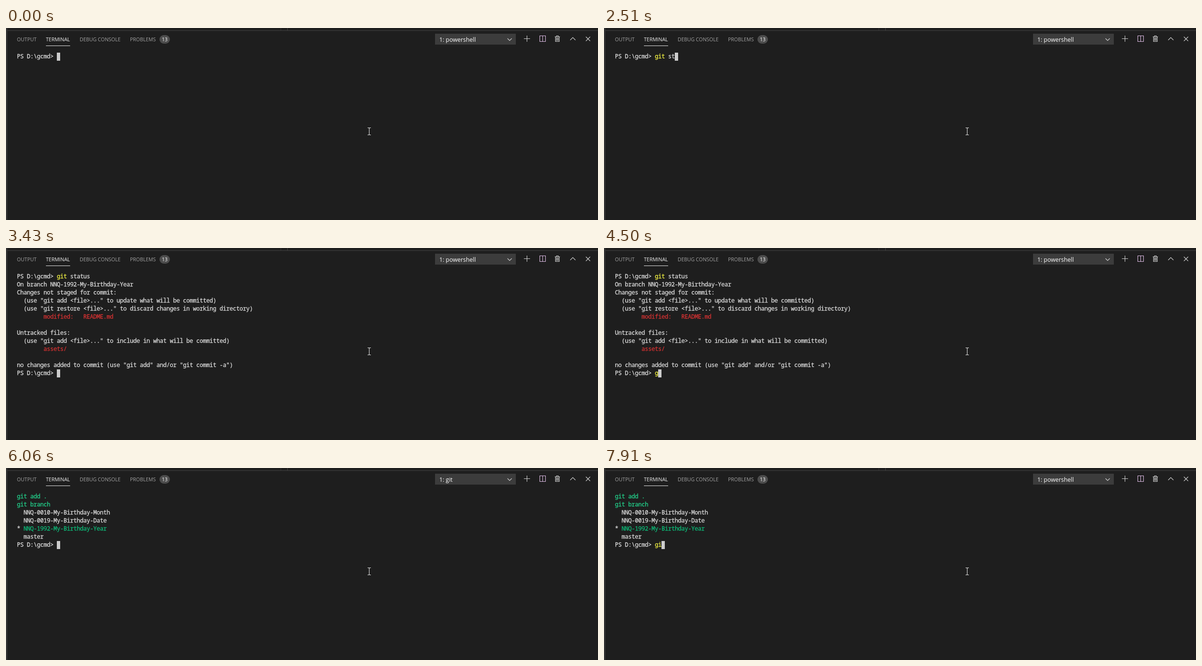
Recreate the animation shown at these times as an HTML page. Size 1246 by 405 pixels, loop 8 s.

```html
<!DOCTYPE html>
<html lang="en">
<head>
<meta charset="utf-8">
<title>Terminal</title>
<style>
html, body { margin: 0; width: 100%; height: 100%; overflow: hidden; background: #1e1e1e; }
svg { display: block; }
text { white-space: pre; }
.ui { font-family: "Open Sans", sans-serif; font-size: 10.5px; fill: #a2a2a2; }
.ui .on { fill: #f0f0f0; }
#title { font-size: 12.4px; fill: #fff; }
#term { font: 12.2px "Noto Sans Mono", monospace; letter-spacing: -.32px; }
#term text { fill: #dcdcdc; stroke: #dcdcdc; stroke-width: .3; }
#term .y { fill: #f5f543; stroke: #f5f543; }
#term .r { fill: #d63232; stroke: #d63232; }
#term .g { fill: #23d18b; stroke: #23d18b; }
#term .b { fill: #0dbc79; stroke: #0dbc79; }
.icons { fill: none; stroke: #d0d0d0; stroke-width: 1.1; }
</style>
</head>
<body>
<svg width="1246" height="405" viewBox="0 0 1246 405">
  <rect width="1246" height="405" fill="#1e1e1e"/>
  <path d="M0 0h3v405h-3z" fill="#333"/>
  <path d="M3 5.5H1246M592.5 0v5" stroke="#424242"/>
  <path d="M578.5 0v5" stroke="#333"/>
  <g class="ui">
    <text x="23" y="28">OUTPUT</text>
    <text x="84" y="28" class="on">TERMINAL</text>
    <text x="155" y="28">DEBUG CONSOLE</text>
    <text x="261" y="28">PROBLEMS</text>
    <path d="M84 37.5h51" stroke="#e7e7e7"/>
    <rect x="323" y="15" width="22" height="18" rx="9" fill="#4d4d4d"/>
    <text x="334" y="28" text-anchor="middle" style="fill:#fff">13</text>
    <rect x="903" y="12" width="170" height="23" fill="#3c3c3c"/>
    <text id="title" x="912" y="29"></text>
  </g>
  <g class="icons">
    <path d="M1055.5 22l4.5 4.5 4.5-4.5"/>
    <path d="M1090 22.5h13M1096.5 16v13"/>
    <path d="M1123.5 16.5h12v12h-12zM1129.5 16.5v12" stroke="#dfbde6"/>
    <path d="M1155 18.5h11M1158.5 18v-1.5h4v1.5M1156.5 19v9.5h8V19M1158.5 20v7M1160.5 20v7M1162.5 20v7"/>
    <path d="M1187.5 25.5l5.5-5.5 5.5 5.5M1220.5 18.5l9 9M1229.5 18.5l-9 9"/>
    <path d="M761 210.5h2.5l1 1 1-1h2.5M764.5 211v14M761 225.5h2.5l1-1 1 1h2.5" stroke="#e0e0e0"/>
  </g>
  <g id="term"></g>
</svg>
<script>
const LOOP = 8000, LEFT = 23, TOP = 52, CELL = 7, ROW = 17;
const PROMPT = 'PS D:\\gcmd> ';
const term = document.getElementById('term');
const title = document.getElementById('title');

// A run of text is a plain string or a [class, text] pair.
const STATUS = [
  [PROMPT, ['y', 'git'], ' status'],
  ['On branch NNQ-1992-My-Birthday-Year'],
  ['Changes not staged for commit:'],
  ['  (use "git add <file>..." to update what will be committed)'],
  ['  (use "git restore <file>..." to discard changes in working directory)'],
  ['        ', ['r', 'modified:   README.md']],
  [],
  ['Untracked files:'],
  ['  (use "git add <file>..." to include in what will be committed)'],
  ['        ', ['r', 'assets/']],
  [],
  ['no changes added to commit (use "git add" and/or "git commit -a")']
];
const BRANCHES = [
  [['g', 'git add .']],
  [['g', 'git branch']],
  ['  NNQ-0010-My-Birthday-Month'],
  ['  NNQ-0019-My-Birthday-Date'],
  ['* ', ['b', 'NNQ-1992-My-Birthday-Year']],
  ['  master']
];

// Each scene types a command; keys holds [time, characters typed so far].
const SCENES = [
  { start: 0, lines: [], command: 'git status',
    keys: [[790, 1], [1530, 2], [1680, 3], [2260, 5], [2510, 6], [2630, 8], [2910, 9], [3030, 10]] },
  { start: 3430, lines: STATUS, command: 'gadd',
    keys: [[4500, 1], [4960, 2], [5230, 3], [5480, 4]] },
  { start: 6060, lines: BRANCHES, command: 'gi',
    keys: [[7510, 1], [7910, 2]] }
];

const escapeText = s => s.replace(/&/g, '&amp;').replace(/</g, '&lt;').replace(/>/g, '&gt;');
const span = run => typeof run === 'string'
  ? escapeText(run)
  : `<tspan class="${run[0]}">${escapeText(run[1])}</tspan>`;
const line = (runs, row) =>
  `<text x="${LEFT}" y="${TOP + 12 + row * ROW}">${runs.map(span).join('')}</text>`;

let shown = '';
function draw(now) {
  const t = now % LOOP;
  const scene = SCENES.filter(s => s.start <= t).pop();
  const count = scene.keys.reduce((n, [time, typed]) => time <= t ? typed : n, 0);
  const [word, ...rest] = scene.command.slice(0, count).split(' ');
  const tail = rest.length ? ' ' + rest.join(' ') : '';
  const row = scene.lines.length;
  const x = LEFT + (PROMPT.length + count) * CELL;
  const html = [...scene.lines, [PROMPT, ['y', word], tail]].map(line).join('') +
    `<rect x="${x}" y="${TOP + row * ROW}" width="${CELL}" height="${ROW}" fill="#ccc"/>`;
  if (html !== shown) term.innerHTML = shown = html;
  title.textContent = t >= 6060 && t < 6340 ? '1: git' : '1: powershell';
  requestAnimationFrame(draw);
}
draw(0);
</script>
</body>
</html>
```
